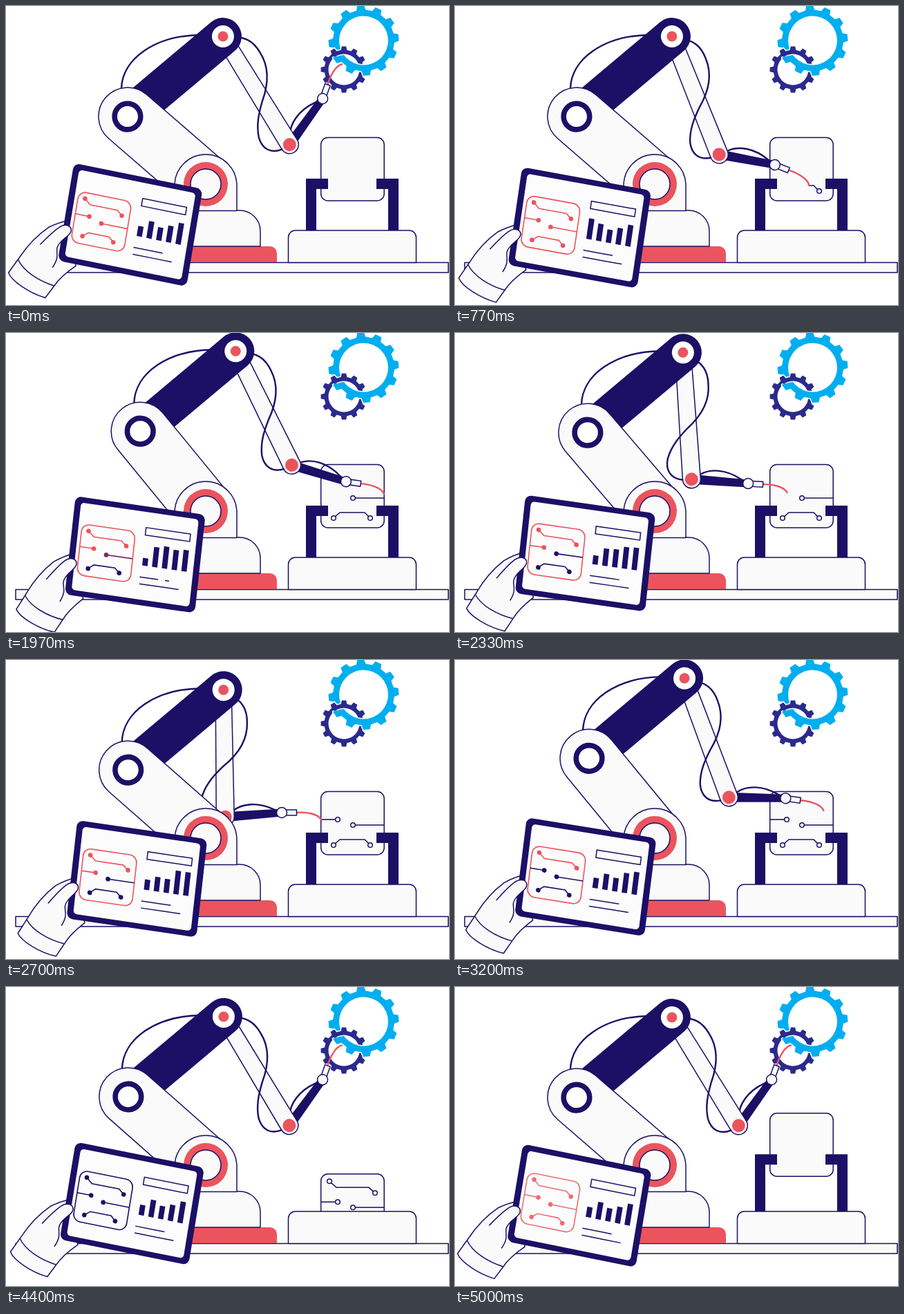
Recreate the animation shown at these times as an HTML page. Size 641x433 px, loop 5030 ms.

```html
<!DOCTYPE html>
<html lang="en">
<head>
<meta charset="utf-8">
<title>Robot arm etching a circuit panel</title>
<style>
  html, body { margin: 0; width: 100%; height: 100%; overflow: hidden; background: #fff; }
  svg { display: block; width: 641px; height: 433px; }
  .line { fill: #fafafa; stroke: #1b1066; stroke-width: 1.5; stroke-linejoin: round; }
  .wire { fill: none; stroke: #1b1066; stroke-width: 2.4; stroke-linecap: round; }
  .thin { fill: none; stroke: #1b1066; stroke-width: 1.5; }
  .navy { fill: #1b1066; }
  .red { fill: #eb545e; }
  .trace { fill: none; stroke: currentColor; stroke-width: 1.6; vector-effect: non-scaling-stroke; }
  .gear { fill-rule: evenodd; stroke: #fff; stroke-width: 3; paint-order: stroke; }
  .cyan { fill: #00aeef; }
  .indigo { fill: #2b2a8c; }
  #panelTraces { color: #1b1066; }
</style>
</head>
<body>
<svg viewBox="0 0 641 433">
  <defs>
    <clipPath id="aboveStand"><rect x="400" y="0" width="200" height="326"/></clipPath>
    <clipPath id="lowerRing"><rect x="470" y="73" width="110" height="40"/></clipPath>
  </defs>

  <rect class="line" x="14" y="371.5" width="626" height="14.5"/>

  <g clip-path="url(#aboveStand)">
    <g id="lift">
      <rect class="line" x="455.7" y="190.5" width="91.5" height="91.5" rx="10"/>
      <g id="panelTraces"></g>
      <path class="navy" d="M434 345V250H466V265H449V345ZM568 345V250H536V265H553V345Z"/>
    </g>
  </g>
  <path class="line" d="M408.5 371.5V335a10 10 0 0 1 10 -10H583.5a10 10 0 0 1 10 10V371.5Z"/>

  <path id="bigGear" class="gear cyan"/>
  <path id="smallGear" class="gear indigo"/>

  <g id="tool">
    <path class="wire" d="M12 -8C25 -17 48 -19 72 -5"/>
    <path class="navy" d="M0 -7L82 -5.5V5.5L0 7Z"/>
  </g>
  <g id="nozzle">
    <path d="M21 0C34 -1 52 1 57 10" fill="none" stroke="#eb545e" stroke-width="2.4" stroke-linecap="round"/>
    <rect class="line" x="6" y="-4" width="15.5" height="8"/>
    <circle class="line" r="7.5"/>
  </g>
  <g id="forearm">
    <path class="line" d="M0 -11.5L184 -13A13 13 0 0 1 184 13L0 11.5Z"/>
    <circle class="red" cx="184" r="9.5"/>
    <path class="wire" d="M5 -5C15 -28 30 -34 48 -33.5C75 -34 95 -18 110 1C122 14 134 26 152 32.500C169 37 181 30 184 13"/>
  </g>
  <path id="bigGearFront" class="gear cyan" clip-path="url(#lowerRing)"/>

  <g id="upper">
    <path class="wire" d="M-9 -40C-8 -84 40 -117 104 -118"/>
    <path d="M0 0L138 -116" stroke="#1b1066" stroke-width="54" stroke-linecap="round"/>
    <circle cx="138" cy="-116" r="16" fill="#fff"/>
    <circle class="red" cx="138" cy="-116" r="7.5"/>
  </g>
  <g id="lower">
    <path class="line" d="M0 -42H149.6V42H0A42 42 0 0 1 0 -42Z"/>
    <circle r="18.8" fill="#fff" stroke="#1b1066" stroke-width="7.6"/>
  </g>

  <path class="red" d="M186 371V358a10 10 0 0 1 10 -10H382a10 10 0 0 1 10 10V371Z"/>
  <path class="line" d="M210 348V326a30 30 0 0 1 30 -30H338a30 30 0 0 1 30 30V348Z"/>
  <path class="line" d="M244 296.5V260A45 45 0 0 1 334 260V296.5Z"/>
  <circle class="red" cx="289" cy="258" r="32"/>
  <circle class="line" cx="289" cy="258" r="22"/>

  <g id="tablet">
    <g transform="translate(2 1)">
      <path class="line" d="M-90 10C-100 14 -110 20 -118 26C-132 40 -145 60 -152.400 77L-164.500 102C-158 113 -130 125 -106 127L-96 107.400C-91 96 -80 83 -70 73Z"/>
      <path class="thin" d="M-154 80.500C-144 95 -120 105 -96 107.400"/>
    </g>
    <rect class="navy" x="-95" y="-71.500" width="190" height="143" rx="9"/>
    <rect x="-86" y="-63.500" width="172" height="127" rx="5" fill="#fcfcfc"/>
    <g id="chip">
      <rect class="trace" x="-81" y="-33" width="78" height="74" rx="11"/>
    </g>
    <g id="chipTraces" transform="translate(-81 -33) scale(.857 .805) translate(-456 -190)"></g>
    <rect class="thin" x="11.500" y="-41" width="65" height="11"/>
    <g id="bars"></g>
    <path id="text1" class="thin" d="M10 31H53"/>
    <path id="text2" class="thin" d="M10.500 41H68"/>
    <path class="line" d="M-124 54C-116 42 -108 31 -101 24C-93 16 -83 18 -83 26C-83 34 -98 41 -99 54C-99 62 -93 66 -101 83"/>
  </g>
</svg>

<script>
const LOOP = 5030;
const $ = id => document.getElementById(id);
const rad = d => d * Math.PI / 180;
const deg = r => r * 180 / Math.PI;
const clamp = v => Math.max(0, Math.min(1, v));
const ease = p => (1 - Math.cos(Math.PI * clamp(p))) / 2;
const span = (t, a, b) => clamp((t - a) / (b - a));

function add(parent, tag, attrs) {
  const el = document.createElementNS("http://www.w3.org/2000/svg", tag);
  for (const k in attrs) el.setAttribute(k, attrs[k]);
  return parent.appendChild(el);
}

// Eased interpolation over rows of [time, ...values]
function key(rows, t) {
  let i = 0;
  while (i < rows.length - 2 && t >= rows[i + 1][0]) i++;
  const a = rows[i], b = rows[i + 1];
  const p = ease(span(t, a[0], b[0]));
  return a.slice(1).map((v, k) => v + (b[k + 1] - v) * p);
}

function place(id, x, y, angle = 0) {
  $(id).setAttribute("transform", `translate(${x} ${y}) rotate(${angle})`);
}

function gear(cx, cy, outer, root, hole, teeth, phase) {
  const step = 2 * Math.PI / teeth;
  const pts = [];
  for (let i = 0; i < teeth; i++) {
    for (const [off, r] of [[-.29, root], [-.18, outer], [.18, outer], [.29, root]]) {
      const a = rad(phase) + (i + off) * step;
      pts.push((cx + r * Math.cos(a)).toFixed(1) + " " + (cy + r * Math.sin(a)).toFixed(1));
    }
  }
  return `M${pts.join("L")}ZM${cx - hole} ${cy}a${hole} ${hole} 0 1 0 ${2 * hole} 0a${hole} ${hole} 0 1 0 ${-2 * hole} 0Z`;
}
const big = gear(517.5, 50, 51, 44.5, 35.5, 12, -95);
$("bigGear").setAttribute("d", big);
$("bigGearFront").setAttribute("d", big);
$("smallGear").setAttribute("d", gear(489, 92, 33.5, 28.5, 22.5, 12, -90));

// Circuit traces in panel coordinates, in etching order
const traces = [
  { d: "M527 268L519 260H483L474 268", nodes: [[527, 268], [474, 268]], from: 600, to: 1060, tint: 1150 },
  { d: "M502 239H547", nodes: [[502, 239]], from: 1620, to: 1970, tint: 1870 },
  { d: "M480 231H456", nodes: [[480, 231]], from: 2350, to: 2690, tint: 2760 },
  { d: "M534 218L525 210H478L468 201", nodes: [[534, 218], [468, 201]], from: 3230, to: 3720, tint: 3800 }
];
for (const tr of traces) {
  tr.path = add($("panelTraces"), "path", { class: "trace", d: tr.d });
  tr.len = tr.path.getTotalLength();
  tr.dots = tr.nodes.map(([cx, cy]) => add($("panelTraces"), "circle", { class: "line", cx, cy, r: 3.3 }));
  tr.copy = add($("chipTraces"), "g", {});
  add(tr.copy, "path", { class: "trace", d: tr.d });
  for (const [cx, cy] of tr.nodes)
    add(tr.copy, "ellipse", { cx, cy, rx: 3.9, ry: 4.1, fill: "currentColor" });
}

const bars = [0, 1, 2, 3, 4].map(i =>
  add($("bars"), "rect", { class: "navy", x: 11.8 + 14.3 * i, width: 7.8 }));
const barKeys = [
  [0, 15, 25, 19, 24, 31], [770, 30, 25, 19, 24, 31], [1970, 11, 29, 32, 29, 31],
  [2700, 15, 21, 20, 34, 34], [3730, 15, 25, 19, 23, 31], [LOOP, 15, 25, 19, 24, 31]
];

// Tip position and nozzle angle
const tipKeys = [
  [0, 487, 84, -70], [40, 487, 84, -70], [600, 527, 268, 24], [1060, 474, 268, 15],
  [1100, 474, 268, 15], [1620, 502, 239, 12], [1970, 547, 233, 8], [2000, 547, 239, 8],
  [2350, 480, 231, 3], [2690, 456, 231, 0], [2720, 456, 231, 0], [3230, 534, 218, 8],
  [3720, 468, 201, 8.5], [3820, 468, 201, 8.5], [4410, 487, 84, -70], [LOOP, 487, 84, -70]
];
const raiseKeys = [
  [0, 0], [1100, 0], [1600, 9.8], [2200, 9.8], [2780, 0], [3230, 9.8],
  [3970, 9.8], [4480, 0], [LOOP, 0]
];
const liftKeys = [[0, 0], [4230, 0], [4550, 145], [4600, 145], [4960, -9], [LOOP, -7]];

function drawArm(t) {
  const a = rad(40.9 + key(raiseKeys, t)[0]);
  const ex = 289 - 149.6 * Math.cos(a), ey = 258 - 149.6 * Math.sin(a);
  const tx = ex + 138, ty = ey - 116;
  place("lower", ex, ey, deg(a));
  place("upper", ex, ey);

  let [px, py, turn] = key(tipKeys, t);
  const active = traces.find(tr => t >= tr.from && t < tr.to);
  if (active) {
    const p = active.path.getPointAtLength(active.len * ease(span(t, active.from, active.to)));
    px = p.x;
    py = p.y;
  }
  const n = rad(turn);
  const jx = px - 57 * Math.cos(n) + 10 * Math.sin(n);
  const jy = py - 57 * Math.sin(n) - 10 * Math.cos(n);

  // Two-link reach from the top joint to the nozzle joint
  const L1 = 184, L2 = 82;
  const dist = Math.max(L1 - L2 + 1, Math.min(L1 + L2 - 1, Math.hypot(jx - tx, jy - ty)));
  const bend = Math.acos((L1 * L1 + dist * dist - L2 * L2) / (2 * L1 * dist));
  const f = Math.atan2(jy - ty, jx - tx) + bend;
  const wx = tx + L1 * Math.cos(f), wy = ty + L1 * Math.sin(f);
  place("forearm", tx, ty, deg(f));
  place("tool", wx, wy, deg(Math.atan2(jy - wy, jx - wx)));
  place("nozzle", jx, jy, turn);
}

function mix(p) {
  const red = [235, 84, 94], navy = [27, 16, 102];
  return `rgb(${red.map((v, i) => Math.round(v + (navy[i] - v) * p)).join()})`;
}

function drawTraces(t) {
  place("lift", 0, key(liftKeys, t)[0]);
  const blank = t > 4580;
  for (const tr of traces) {
    const p = blank ? 0 : ease(span(t, tr.from, tr.to));
    tr.path.style.strokeDasharray = `${tr.len * p} 200`;
    tr.path.style.visibility = p > 0 ? "visible" : "hidden";
    tr.dots.forEach((dot, i) => {
      dot.style.visibility = p > 0 && (!i || p === 1) ? "visible" : "hidden";
    });
    tr.copy.style.color = mix(t > 4750 ? 0 : span(t, tr.tint, tr.tint + 180));
  }
  $("chip").style.color = traces[3].copy.style.color;
  const fade = t > 4750 ? span(t, 4750, LOOP + 20) : 1 - span(t, 4570, 4750);
  $("chip").style.opacity = $("chipTraces").style.opacity = t < 40 ? 1 : fade;
}

function drawTablet(t) {
  const wave = peak => Math.cos(2 * Math.PI * (t - peak) / LOOP);
  const x = 184.4 - 5 * wave(300), y = 317.4 + 4.9 * wave(1350), angle = 9.8 + 1.7 * wave(4800);
  $("tablet").setAttribute("transform", `translate(${x} ${y}) rotate(${angle}) skewX(2)`);
  key(barKeys, t).forEach((h, i) => {
    bars[i].setAttribute("y", 14 - h);
    bars[i].setAttribute("height", h);
  });
  const bump = at => ease(1 - Math.abs(t - at) / 300);
  $("text1").style.strokeDasharray = `27 ${10 * bump(1970)} ${6 + 60 * (1 - bump(1970))} 100`;
  $("text2").style.strokeDasharray = `34 ${17 * bump(3730)} 100`;
}

const start = performance.now();
function draw() {
  const t = (performance.now() - start) % LOOP;
  drawArm(t);
  drawTraces(t);
  drawTablet(t);
  requestAnimationFrame(draw);
}
draw();
</script>
</body>
</html>
```
